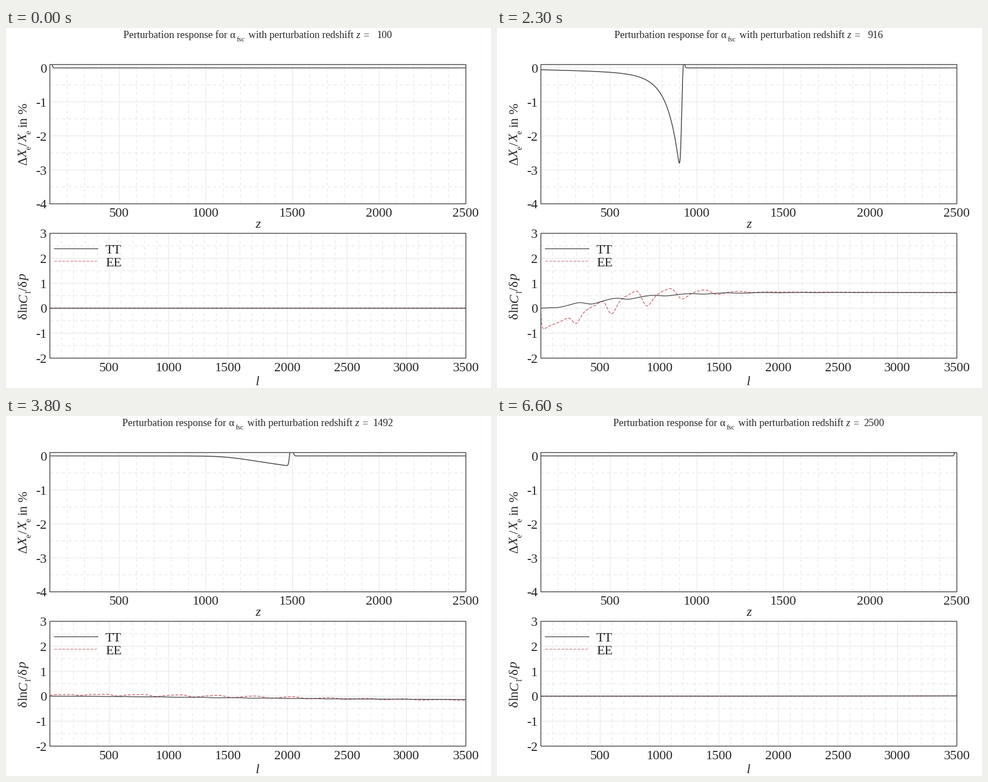
A matplotlib script that plays this animation: 868x645 px, repeating every 6800 ms.

```python
import math

import matplotlib.pyplot as plt
import numpy as np
from matplotlib.animation import FuncAnimation
from matplotlib.patches import Rectangle

W, H, DPI = 868, 645, 100
TICKS, STEP_MS = 68, 100
# Ticks on which the picture rests for one more tick
HOLDS = {3, 8, 12, 16, 19, 23, 28, 31, 35, 39, 43, 48, 51, 55, 59, 63, 67}

INK, LINE, RED = "#262626", "#2c2c2c", "#c4606c"
LEFT, RIGHT = 78, 822.5
TOP_BOX = (65, 314.5)
LOW_BOX = (367.3, 591)
BIG, SMALL, TITLE = 23.6, 15, 18.35

fig = plt.figure(figsize=(W / DPI, H / DPI), dpi=DPI, facecolor="white")
ax = fig.add_axes([0, 0, 1, 1])
# Whole numbers fall on pixel centres
ax.set_xlim(-.5, W - .5)
ax.set_ylim(H - .5, -.5)
ax.axis("off")


def pt(px):
    return px * 72 / DPI


def zx(z):
    return LEFT + (z - 100) * 0.3102


def top_y(v):
    return 71.0 - 60.87 * v


def lx(l):
    return 77.7 + l * 0.2128


def low_y(v):
    return 501.5 - 44.75 * v


def bell(x, mid, width):
    return np.exp(-((x - mid) / width) ** 2)


# ---- ionisation response ---------------------------------------------------
Z = np.arange(100, 2501, 1.0)
erf = np.vectorize(math.erf)


def log_memory(z):
    """Log of how much of a change survives; steepest near z = 960."""
    return .002 * z + 3.13 * erf((z - 960) / 283)


def ionisation(zp):
    depth = np.interp(zp, [100, 676, 772, 916, 970, 1156, 1348, 1444, 1560],
                      [.0, .18, .52, 2.97, 3.5, 2.05, 1.25, .5, 0])
    u = (Z - zp) / 7.5
    fade = np.minimum(np.exp(log_memory(Z) - log_memory(zp - 16)), 1.25)
    step = .5 * (1 - erf(u / math.sqrt(2)))
    spike = .45 + .75 * bell(zp, 950, 420)
    return spike * np.exp(-u * u / 2) - depth * fade * step


# ---- power spectrum response -------------------------------------------------
L = np.arange(2, 3501, 3.0)


def wave(peak, period, skew):
    """Cosine that falls faster than it climbs."""
    p = 2 * np.pi * (L - peak) / period
    return np.cos(p + skew * (1 - np.cos(p)))


def onset(scale, power=1):
    return 1 - np.exp(-(L / scale) ** power)


TT_WAVE = wave(935, 313, .3)
EE_SKEW = .1 + 1.3 * np.exp(-L / 1000)
EE_WAVE = wave(787, 313.8, EE_SKEW)

TT_EARLY = .63 * onset(730, 1.5) + .12 * np.exp(-L / 700) * onset(250, 2) * TT_WAVE
EE_EARLY = onset(8) * (.685 - .06 * L / 3500 - 1.55 * np.exp(-(L / 600) ** 1.5)
                       + .35 * bell(L, 750, 600) * wave(797, 292, EE_SKEW))
TT_MID = (1.8 * (L / 3500) ** 2.5 - .15 * onset(300)
          + .43 * bell(L, 1750, 1300) * onset(250, 2) * TT_WAVE)
EE_MID = onset(60) * (1.45 * ((L - 1500) / 1900) ** 2 - .42
                      + .78 * bell(L, 2100, 1450) * EE_WAVE)
TT_LATE = -1.28 * onset(2150, 1.7) + .065 * bell(L, 1500, 1100) * TT_WAVE
EE_LATE = onset(12) * (-.45 - 1.05 * np.tanh((L - 1950) / 1400)
                       + .35 * bell(L, 1350, 2000) * onset(200) * EE_WAVE)


def spectra(zp):
    early = np.interp(zp, [400, 676, 772, 868, 916, 1060, 1156],
                      [0, .045, .17, .63, 1, .3, 0])
    mid = np.interp(zp, [916, 1060, 1156, 1348], [0, 1.45, 1, 0])
    late = np.interp(zp, [1156, 1348, 1492, 1560], [0, 1, .12, 0])
    tail = np.interp(zp, [1480, 1600, 2500], [0, .05, .012]) * (L / 3500) ** 2
    return (early * TT_EARLY + mid * TT_MID + late * TT_LATE + tail,
            early * EE_EARLY + mid * EE_MID + late * EE_LATE + tail)


# ---- fixed parts ---------------------------------------------------------------
def text(x, y, s, px=BIG, italic=False, ha="left", turn=0):
    return ax.text(x, y, s, fontsize=pt(px), family="Liberation Serif", color=INK,
                   style="italic" if italic else "normal", ha=ha, va="baseline",
                   rotation=turn, rotation_mode="anchor", zorder=6)


def rule(xs, ys, major):
    ax.plot(xs, ys, color="#e9e9e9", lw=pt(1.2), zorder=1, snap=False,
            ls="-" if major else (0, (5, 4)))


def panel(box, fx, fy, xr, yr, base):
    y0, y1 = box
    for v in range(xr[0], xr[1], 100):
        rule([fx(v)] * 2, [y1, y0], v % 500 == 0)
    for k in range(2 * yr[0] + 1, 2 * yr[1] + 1):
        if y0 < fy(k / 2) < y1 - 1:
            rule([LEFT, RIGHT], [fy(k / 2)] * 2, k % 2 == 0)
    for v in range(500, xr[1] + 1, 500):
        text(fx(v), base, str(v), ha="center")
    for v in range(yr[0], yr[1] + 1):
        text(72.5, fy(v) + 8.5, str(v), ha="right")
    frame = Rectangle((LEFT, y0), RIGHT - LEFT, y1 - y0, fill=False,
                      ec="#404040", lw=pt(1.4), zorder=5, snap=False)
    return ax.add_patch(frame)


top = panel(TOP_BOX, zx, top_y, (200, 2500), (-4, 0), 338)
low = panel(LOW_BOX, lx, low_y, (100, 3500), (-2, 3), 614.5)
text(450, 357, "z", italic=True, ha="center")
text(450, 639, "l", italic=True, ha="center")

# Pale tick marks at the ends of the zero line
for x in (LEFT + 1, RIGHT - 13):
    ax.plot([x, x + 12], [top_y(0)] * 2, color="#dddddd", alpha=.6,
            lw=pt(1.2), zorder=4)


def upright(parts):
    """Axis name turned to read upwards; an underscore marks a subscript."""
    for y, s in parts:
        sub = s.startswith("_")
        text(44 if sub else 37, y, s.lstrip("_"), SMALL if sub else BIG,
             s in "XCp", turn=90)


upright([(246, "Δ"), (231.6, "X"), (217, "_e"), (210.3, "/"), (203.8, "X"),
         (189, "_e"), (177, "in"), (153, "%")])
upright([(521, "δ"), (509.4, "ln"), (491, "C"), (474.8, "_l"), (470.3, "/"),
         (463.8, "δ"), (452.5, "p")])

DASH = (0, (4, 2))
ax.plot([86, 164], [395] * 2, color=LINE, alpha=.85, lw=pt(1.4), snap=False)
ax.plot([86, 162], [417.3] * 2, color=RED, alpha=.85, lw=pt(1.2), ls=DASH,
        snap=False)
text(177.5, 403.7, "TT")
text(177.5, 426.2, "EE")

# Title pieces with their places for a three-digit counter
TITLE_PARTS = [
    (text(0, 18, "Perturbation response for", TITLE), 209.5),
    (text(0, 18, "α", TITLE), 400),
    (text(0, 24, "fsc", 12.9), 412),
    (text(0, 18, "with perturbation redshift", TITLE), 433),
    (text(0, 18, "z", TITLE, True), 625.3),
    (text(0, 18, "=", TITLE), 639)]
counter = text(691, 18, "", TITLE, ha="right")


# ---- moving parts ----------------------------------------------------------------
def curve(box, color, order, **style):
    line, = ax.plot([], [], color=color, zorder=order, snap=False, **style)
    line.set_clip_path(box)
    return line


xe = curve(top, LINE, 3, lw=pt(1.5), alpha=.88)
ee = curve(low, RED, 3, lw=pt(1.3), ls=DASH)
tt = curve(low, LINE, 3.5, lw=pt(1.45), alpha=.8)


def update(tick):
    zp = 100 + 48 * (tick - sum(h <= tick for h in HOLDS))
    shift = 2 if zp >= 1000 else 0
    for part, x in TITLE_PARTS:
        part.set_x(x - shift)
    counter.set_text(str(zp))
    counter.set_x(691 + shift)
    xe.set_data(zx(Z), top_y(ionisation(zp)))
    t, e = spectra(zp)
    tt.set_data(lx(L), low_y(t))
    ee.set_data(lx(L), low_y(e))
    return xe, tt, ee, counter


anim = FuncAnimation(fig, update, frames=TICKS, interval=STEP_MS, repeat=True,
                     repeat_delay=0, blit=False)
plt.show()
```
